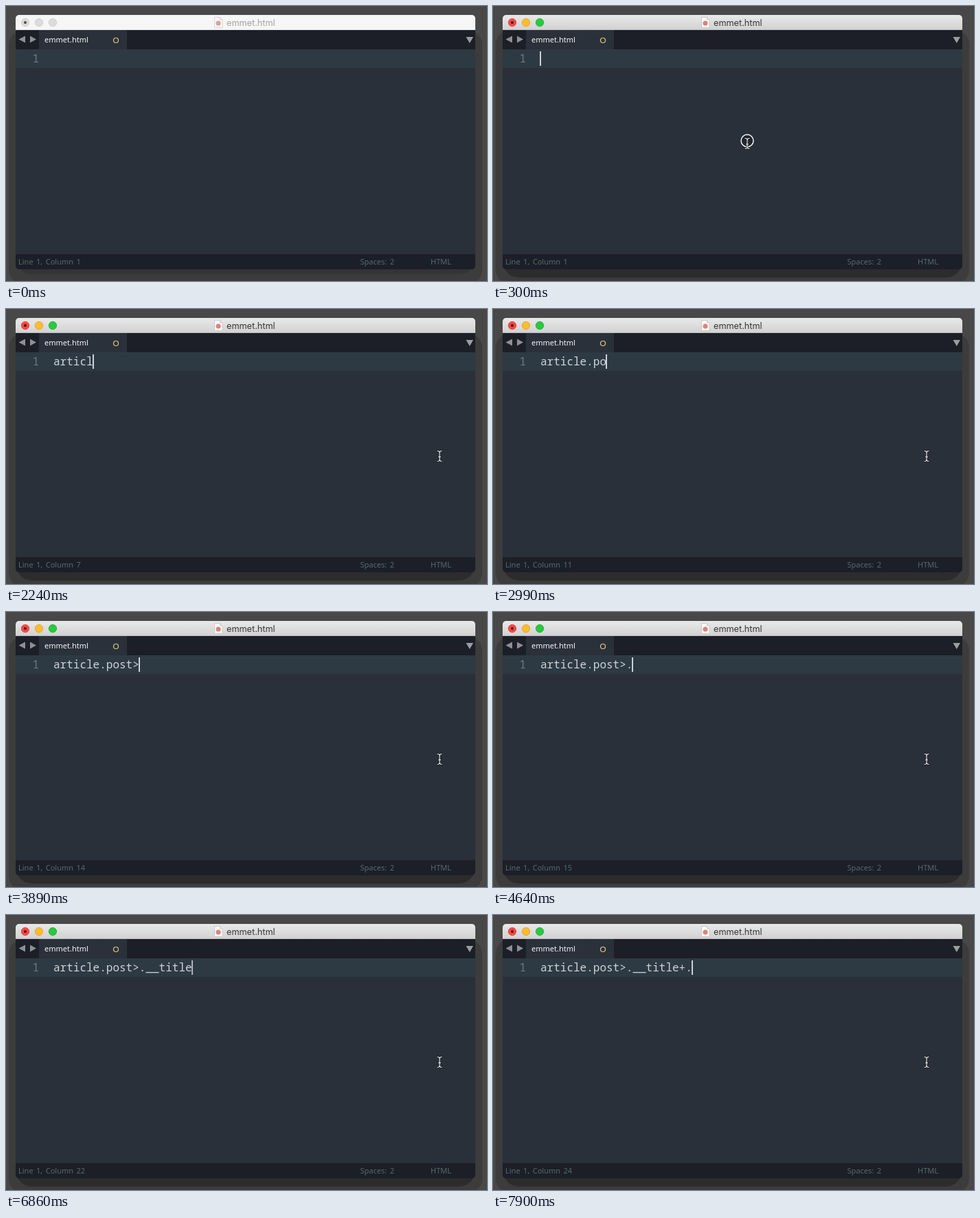
An HTML page that plays this animation: 700 by 400 pixels, repeating every 8000 ms.

```html
<!DOCTYPE html>
<html lang="en">
<head>
<meta charset="utf-8">
<title>Editor typing</title>
<style>
  html, body { margin: 0; width: 100%; height: 100%; overflow: hidden; background: #484848; }
  svg { display: block; width: 700px; height: 400px; }
  text { font: 11px "Noto Sans", "Open Sans", sans-serif; white-space: pre; }
  .title { font: 12.7px Inter, Roboto, sans-serif; fill: #363636; }
  .code { font: 16px "Noto Sans Mono", "DejaVu Sans Mono", monospace; fill: #ced3da; }
  .status { fill: #596771; word-spacing: 1.6px; }
  .idle .title { fill: #a3a3a3; }
  .idle .light { fill: #dcdcdc; stroke: #cacaca; }
  .idle .dot { fill: #4c4c4c; }
  .idle .bar { fill: #f6f6f6; }
  .idle .edge { fill: #e4e4e4; }
  .idle .icon { opacity: .75; }
  .idle .deep { opacity: 0; }
</style>
</head>
<body>
<svg id="stage" class="idle" viewBox="0 0 700 400">
  <defs>
    <linearGradient id="chrome" x2="0" y2="1">
      <stop offset="0" stop-color="#e9e9e9"/>
      <stop offset="1" stop-color="#d1d1d1"/>
    </linearGradient>
    <clipPath id="frame"><rect x="14" y="13" width="669" height="370" rx="5"/></clipPath>
  </defs>

  <!-- desktop and window shadow -->
  <rect width="700" height="400" fill="#484848"/>
  <rect x="4" y="36" width="689" height="368" rx="20" fill="#3c3c3c"/>
  <rect x="16" y="340" width="665" height="50" rx="20" fill="#343434"/>
  <rect class="deep" x="14" y="335" width="669" height="60" rx="24" fill="#2c2c2c"/>

  <g clip-path="url(#frame)">
    <rect x="14" y="13" width="669" height="370" fill="#2a303a"/>
    <rect class="bar" x="14" y="13" width="669" height="22" fill="url(#chrome)"/>
    <rect class="edge" x="14" y="34" width="669" height="1" fill="#bdbdbd"/>
    <rect x="14" y="35" width="669" height="28" fill="#1c1f27"/>
    <rect x="48" y="35" width="128" height="28" fill="#2a313b"/>
    <rect x="14" y="63" width="669" height="27" fill="#2e3a43"/>
    <rect x="14" y="361" width="669" height="22" fill="#1c1f27"/>
  </g>

  <g stroke-width=".8">
    <circle class="light" cx="28" cy="24" r="5.7" fill="#fc4945" stroke="#df3a36"/>
    <circle class="light" cx="48" cy="24" r="5.7" fill="#fdbc2f" stroke="#dfa023"/>
    <circle class="light" cx="68" cy="24" r="5.7" fill="#28c940" stroke="#1dab2f"/>
  </g>
  <circle class="dot" cx="28" cy="24" r="2" fill="#4b0505"/>

  <g class="icon">
    <path d="M303.5 16.5h8l3.5 3.5v11.5h-11.5z" fill="#f8f8f8" stroke="#c3c3c3" stroke-width=".8"/>
    <path d="M311.5 16.5v3.5h3.5" fill="#e4e4e4" stroke="#c3c3c3" stroke-width=".8"/>
    <circle cx="309" cy="25" r="3.5" fill="#d98378"/>
  </g>
  <text class="title" x="321" y="29">emmet.html</text>

  <path d="M28 43.5v10l-9.5-5zM35 43.5v10l9-5z" fill="#8d9094"/>
  <path d="M669.5 45h10.5l-5.2 9z" fill="#9b9da0"/>
  <text x="56" y="53" fill="#f4f5f6">emmet.html</text>
  <circle cx="160" cy="50" r="3.5" fill="none" stroke="#e5c877" stroke-width="1.2"/>

  <text class="code" x="38.5" y="82" style="fill:#6c7a83">1</text>
  <text class="code" id="code" x="69" y="82"></text>
  <rect id="caret" y="66" width="2" height="21" fill="#cbd0d8"/>

  <text class="status" id="place" x="18" y="376"></text>
  <text class="status" x="515.5" y="376">Spaces: 2</text>
  <text class="status" x="618" y="376">HTML</text>

  <g id="mouse">
    <circle id="ring" cy="-4" fill="#1c2129" fill-opacity=".55" stroke="#fff" stroke-width="1.4"/>
    <g fill="none" stroke-linecap="round">
      <path d="M-3 -7.5q3 0 3 2.5q0 -2.5 3 -2.5M0 -5v10M-3 7.5q3 0 3 -2.5q0 2.5 3 2.5M-1.5 1h3" stroke="#15181d" stroke-width="2.6"/>
      <path d="M-3 -7.5q3 0 3 2.5q0 -2.5 3 -2.5M0 -5v10M-3 7.5q3 0 3 -2.5q0 2.5 3 2.5M-1.5 1h3" stroke="#fff" stroke-width="1.1"/>
    </g>
  </g>
</svg>
<script>
const LOOP = 8000;
const WAKE = 150;
const TEXT = "article.post>.__title+.";
const ADVANCE = 9.6;

// moment each character appears
const KEYS = [
  1340, 1490, 1640, 1940, 2090, 2240, 2390, 2540, 2840, 2990, 3140, 3290,
  3890, 4640, 5380, 5530, 5970, 6120, 6270, 6420, 6570, 7310, 7900
];

// [time, caret opacity]
const BLINK = [
  [0, 0], [150, 1], [600, .5], [750, 0], [1040, .5], [1190, 1],
  [3740, .5], [3890, 1], [4340, .5], [4490, 0], [4640, 1],
  [5080, .5], [5230, 0], [5380, 1],
  [6860, .8], [7010, 0], [7160, .5], [7310, 1], [7750, .5], [7900, 1]
];

// [time, ring radius]
const RING = [[0, 0], [150, 7], [300, 9], [450, 0]];

// the pointer moves in these ticks
const TICKS = [450, 600, 750, 890, 1040, 1190];
const FROM = [370, 200], TO = [631, 214];

const $ = id => document.getElementById(id);
const stage = $("stage"), code = $("code"), caret = $("caret");
const place = $("place"), mouse = $("mouse"), ring = $("ring");

const passed = (times, t) => times.filter(at => at <= t).length;
const stepAt = (steps, t) => steps[passed(steps.map(s => s[0]), t) - 1][1];
const ease = p => p * p * (3 - 2 * p);

function draw(t) {
  const idle = t < WAKE;
  stage.classList.toggle("idle", idle);

  const typed = passed(KEYS, t);
  code.textContent = TEXT.slice(0, typed);
  place.textContent = `Line 1, Column ${typed + 1}`;
  caret.setAttribute("x", Math.round(68 + typed * ADVANCE));
  caret.setAttribute("opacity", stepAt(BLINK, t));

  const p = ease(passed(TICKS, t) / TICKS.length);
  const [x, y] = FROM.map((v, i) => v + (TO[i] - v) * p);
  mouse.setAttribute("transform", `translate(${x} ${y})`);
  mouse.setAttribute("visibility", idle ? "hidden" : "visible");

  const r = stepAt(RING, t);
  ring.setAttribute("r", r);
  ring.setAttribute("opacity", r ? 1 : 0);
}

const start = performance.now();
function tick() {
  draw((performance.now() - start) % LOOP);
  requestAnimationFrame(tick);
}
draw(0);
requestAnimationFrame(tick);
</script>
</body>
</html>
```
